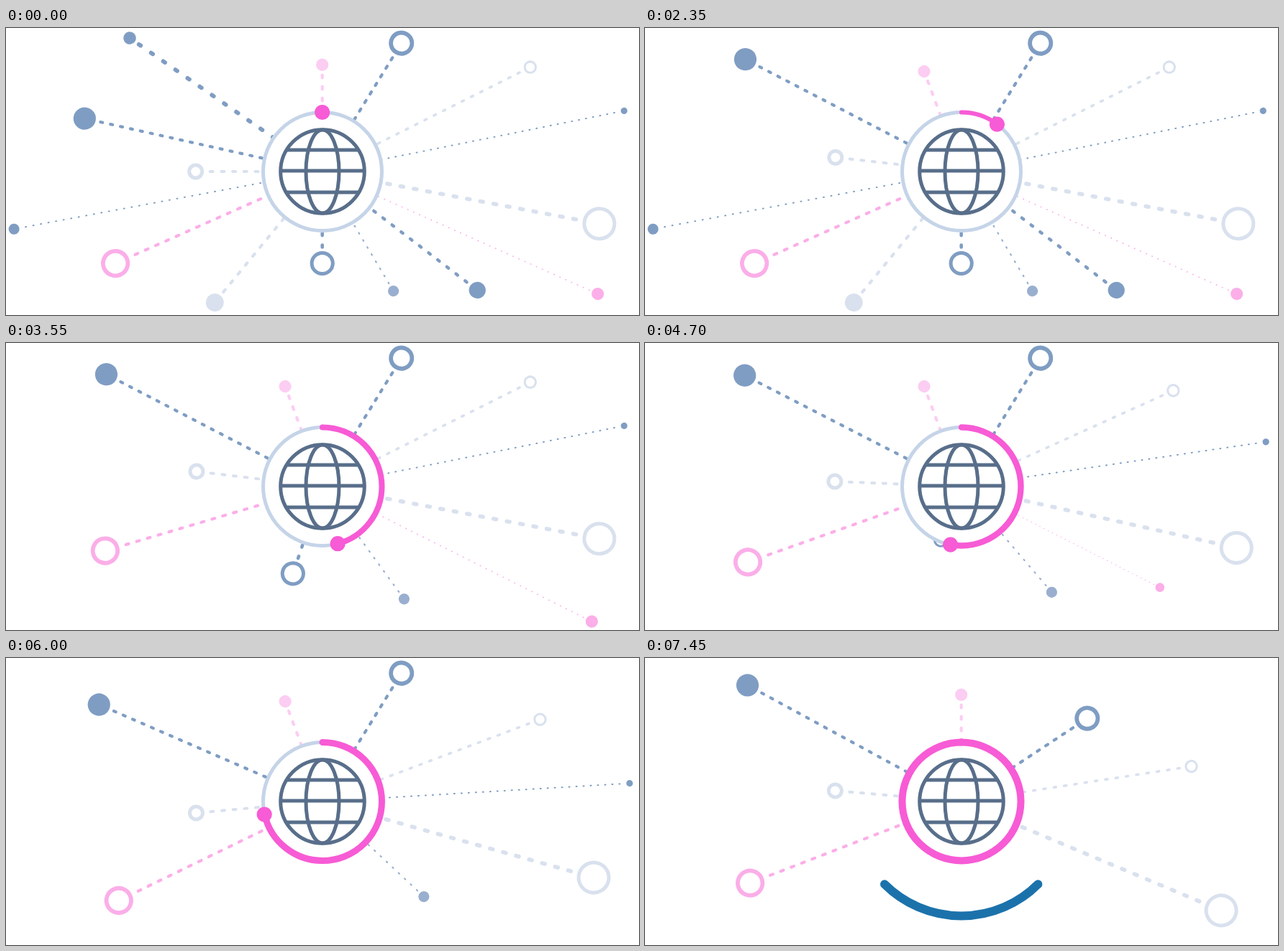
Recreate the animation shown at these times as an HTML page with a canvas. Size 880x400 px, loop 8000 ms.

```html
<!DOCTYPE html>
<html lang="en">
<head>
<meta charset="utf-8">
<title>Network progress</title>
<style>
  html, body { margin: 0; width: 100%; height: 100%; overflow: hidden; background: #fff; }
  canvas { display: block; }
</style>
</head>
<body>
<canvas id="stage" width="880" height="400"></canvas>
<script>
const ctx = document.getElementById('stage').getContext('2d');
const LOOP = 8000, FRAME = 50, FIRST_EVENT = 1000, EVENT_GAP = 1700;
const CX = 439.7, CY = 200, RING = 82.5;
const BLUE = '#7f9dc3', GREY = '#9aafcf', PALE = '#d9e1ee', ROSE = '#fbaee8',
      BLUSH = '#fccdf2', PINK = '#f75bd5', RIM = '#c5d4e8', GLOBE = '#586e8a', SMILE = '#1b72ab';

// angles: one per settled state, the last one repeats
// node: [radius, ring stroke or 0 for a solid dot]; dash: [width, length, period, offset from node]
// collapse: event in which the ray shrinks away; tempo: {event: [delay, speed]}
const rays = [
  { dist: 326, angles: [214.8], node: [8.8, 0], dash: [5.8, 3, 20.6, 17], color: BLUE, collapse: 0 },
  { dist: 338.5, angles: [192.6, 207.5, 207.5, 203.5, 208.6], node: [15.6, 0], dash: [4.2, 3, 14.2, 24],
    color: BLUE, tempo: { 0: [0, 1.6], 2: [220, 1.3] } },
  { dist: 176, angles: [180, 186.4, 186.9, 174.8, 184.9], node: [9, 5], dash: [4, 4, 15.7, 22], color: PALE },
  { dist: 436, angles: [169.4], node: [7.5, 0], dash: [2, 1, 10.7, 16.7], color: BLUE, collapse: 1 },
  { dist: 314.8, angles: [156, 156, 164.4, 154, 159.1], node: [17.2, 5.8], dash: [4.2, 4, 15.6, 32],
    color: ROSE, tempo: { 3: [300, 1] } },
  { dist: 236, angles: [129.3], node: [12.5, 0], dash: [4.2, 4, 16.1, 21], color: PALE, collapse: 1 },
  { dist: 128, angles: [90, 90, 110.9], node: [14.6, 5], dash: [4.6, 3, 16.4, 24], color: BLUE, collapse: 2 },
  { dist: 193.7, angles: [59.3, 59.3, 53.4, 43.2], node: [7.6, 0], dash: [2.2, 1.5, 11.5, 13], color: GREY, collapse: 3 },
  { dist: 271.7, angles: [37.5], node: [11.6, 0], dash: [4.4, 3, 16, 20], color: BLUE, collapse: 1 },
  { dist: 419.2, angles: [24, 24, 27], node: [8.6, 0], dash: [1.7, .4, 8.9, 13], color: ROSE,
    collapse: 2, tempo: { 2: [75, 1] } },
  { dist: 392, angles: [10.7, 10.7, 10.7, 15.7, 22.8], node: [21, 5], dash: [5.6, 4, 18.8, 35], color: PALE },
  { dist: 428, angles: [-11.4, -11.4, -11.4, -3.4], node: [4.6, 0], dash: [2, 1, 10, 14], color: BLUE, collapse: 3 },
  { dist: 323.6, angles: [-26.7, -26.7, -26.7, -20.7, -8.7], node: [7.7, 3], dash: [3.6, 3, 14.5, 18], color: PALE },
  { dist: 210, angles: [-58.4, -58.4, -58.4, -58.4, -33.5], node: [14.6, 5.8], dash: [4.2, 3.5, 14, 25.5], color: BLUE },
  { dist: 148.8, angles: [-90, -110.3, -110.3, -110.3, -90], node: [8.6, 0], dash: [4.2, 4, 16, 16.3], color: BLUSH },
];

// Smooth curve through [ms, value] keys, flat at both ends
function curve(keys) {
  const last = keys.length - 1;
  const slope = i => i === 0 || i === last ? 0
    : (keys[i + 1][1] - keys[i - 1][1]) / (keys[i + 1][0] - keys[i - 1][0]);
  return t => {
    if (t <= 0) return 0;
    if (t >= keys[last][0]) return keys[last][1];
    const i = keys.findIndex(k => k[0] > t) - 1;
    const [t0, v0] = keys[i], [t1, v1] = keys[i + 1];
    const h = t1 - t0, s = (t - t0) / h, q = 1 - s;
    return v0 + (v1 - v0) * s * s * (3 - 2 * s) + h * s * q * (q * slope(i) - s * slope(i + 1));
  };
}
const turn = curve([[0, 0], [300, .38], [550, .775], [850, .89], [1350, 1]]);
const shrink = curve([[0, 0], [300, .38], [550, .78], [850, 1]]);
const swing = curve([[0, 0], [300, .385], [550, .775], [700, 1.08], [800, 1.15], [900, 1.13], [1350, 1]]);

const rad = deg => deg * Math.PI / 180;
const eventTime = (t, event, [delay, speed] = [0, 1]) =>
  (t - FIRST_EVENT - event * EVENT_GAP - delay) * speed;

// Value that moves from state to state, one step per event
function follow(states, ease, t, tempo = {}) {
  let value = states[0];
  for (let e = 0; e < states.length - 1; e++)
    value += (states[e + 1] - states[e]) * ease(eventTime(t, e, tempo[e]));
  return value;
}

function stroke(color, width) {
  ctx.strokeStyle = color;
  ctx.lineWidth = width;
  ctx.stroke();
}

function circle(x, y, r, fill, line, width) {
  ctx.beginPath();
  ctx.arc(x, y, r, 0, 2 * Math.PI);
  if (fill) { ctx.fillStyle = fill; ctx.fill(); }
  if (line) stroke(line, width);
}

function drawRay({ dist, angles, node, dash, color, collapse, tempo = {} }, t) {
  const scale = collapse === undefined ? 1 : 1 - shrink(eventTime(t, collapse, tempo[collapse]));
  if (scale <= 0) return;
  const [width, length, period, offset] = dash, [radius, ringWidth] = node;
  ctx.save();
  ctx.translate(CX, CY);
  ctx.rotate(rad(follow(angles, turn, t, tempo)));
  ctx.scale(scale, scale);
  ctx.setLineDash([length, period - length]);
  ctx.beginPath();
  ctx.moveTo(dist - offset + length / 2, 0);
  ctx.lineTo(50, 0);
  stroke(color, width);
  ctx.setLineDash([]);
  if (ringWidth) circle(dist, 0, radius, '#fff', color, ringWidth);
  else circle(dist, 0, radius, color);
  ctx.restore();
}

function drawGlobe() {
  circle(440, 200, 58.3, null, GLOBE, 5);
  ctx.beginPath();
  ctx.ellipse(440, 200, 23, 58, 0, 0, 2 * Math.PI);
  for (const [y, half] of [[170, 50], [199, 58], [229, 50]]) {
    ctx.moveTo(440 - half, y);
    ctx.lineTo(440 + half, y);
  }
  stroke(GLOBE, 5);
}

function drawProgress(t) {
  const angle = Math.min(360, follow([0, 37.1, 148.6, 257.4, 367.6], swing, t));
  const end = rad(angle - 90);
  if (angle > 0) {
    ctx.beginPath();
    ctx.arc(440, CY, RING, -Math.PI / 2, end);
    stroke(PINK, follow([5, 6.2, 8, 9, 10], shrink, t));
  }
  const s = Math.max(0, Math.min(1, (t - 6350) / 800));
  const radius = 10.6 - 5.6 * s * s * (3 - 2 * s);
  circle(CX + RING * Math.cos(end), CY + RING * Math.sin(end), radius, PINK);
}

function drawSmile(t) {
  const p = shrink(eventTime(t, 3));
  if (p <= 0) return;
  ctx.beginPath();
  ctx.arc(439.7, 208.6, 150.9, rad(135), rad(135 - 90 * p), true);
  stroke(SMILE, 12 * p);
}

function draw(t) {
  ctx.fillStyle = '#fff';
  ctx.fillRect(0, 0, 880, 400);
  ctx.lineCap = 'round';
  rays.forEach(ray => drawRay(ray, t));
  circle(440, CY, RING, '#fff', RIM, 5);
  ctx.lineCap = 'butt';
  drawGlobe();
  ctx.lineCap = 'round';
  drawProgress(t);
  drawSmile(t);
}

const start = performance.now();
function tick() {
  const t = (performance.now() - start) % LOOP;
  draw(Math.floor(t / FRAME) * FRAME);
  requestAnimationFrame(tick);
}
tick();
</script>
</body>
</html>
```
